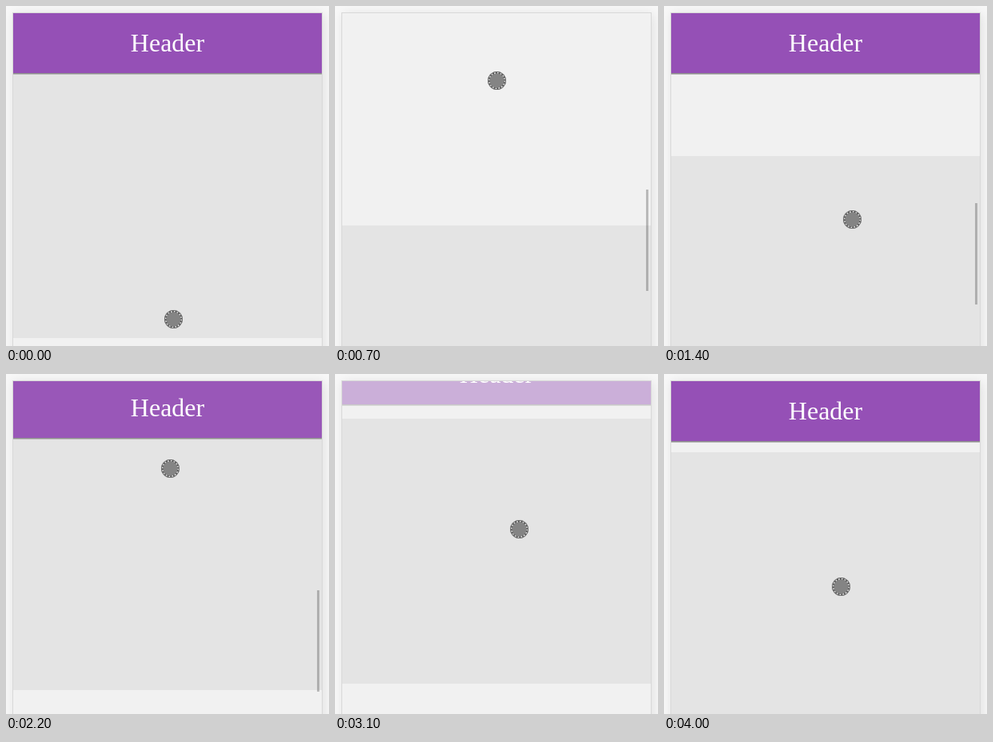
An HTML page with a canvas that plays this animation: 404 px wide and 426 px high, repeating every 4.3 s.

```html
<!DOCTYPE html>
<html lang="en">
<head>
<meta charset="utf-8">
<title>Hiding header</title>
<style>
  html, body { margin: 0; width: 100%; height: 100%; overflow: hidden; }
  canvas { display: block; }
</style>
</head>
<body>
<canvas id="stage" width="404" height="426"></canvas>
<script>
const ctx = document.getElementById('stage').getContext('2d');
const LOOP = 4300, STEP = 100;
const LEFT = 9, TOP = 9, WIDTH = 386, HEADER = 75, SECTION = 332;
const HIDDEN = 78, SLIDE = 250;

const smooth = u => u * u * (3 - 2 * u);
const coast = u => 1 - (1 - u) ** 3;

// A track starts at a value and runs through moves, each with its own easing.
const move = (start, end, to, ease = smooth) => ({ start, end, to, ease });
const track = (from, ...moves) => t => moves.reduce((value, m) => {
  const u = Math.min(1, Math.max(0, (t - m.start) / (m.end - m.start)));
  return value + (m.to - value) * m.ease(u);
}, from);

// Two swipes up, each followed by a slower drag down.
const pointerX = track(209.5,
  move(150, 600, 202.5), move(700, 1600, 240.3), move(1750, 2200, 205.5),
  move(2550, 3100, 230.5), move(3100, 3700, 222.5), move(3900, 4000, 221.5));
const pointerY = track(392.5,
  move(150, 600, 93.5), move(700, 1600, 292.6), move(1750, 2275, 108.5),
  move(2550, 3574, 264), move(3900, 4000, 266.5));
const scrollTop = track(0,
  move(150, 450, 350), move(450, 1031, 1316, coast), move(1050, 1600, 1184),
  move(1800, 2200, 1348), move(2200, 2944, 2720, coast), move(2944, 3273, 2642));

const slide = (start, to) => move(start, start + SLIDE, to);
const headerShift = track(0,
  slide(250, HIDDEN), slide(1150, 0), slide(2166, HIDDEN), slide(2990, 0));

function rect(color, x, y, w, h) {
  ctx.fillStyle = color;
  ctx.fillRect(x, y, w, h);
}

function drawFrame() {
  rect('#f8f8f8', 0, 0, 404, 426);
  ctx.save();
  ctx.shadowColor = 'rgba(0,0,0,.1)';
  ctx.shadowBlur = 14;
  ctx.shadowOffsetX = 2;
  ctx.shadowOffsetY = 2;
  rect('#d8d8d8', LEFT - 1, TOP - 1, WIDTH + 2, 460);
  ctx.restore();
}

function drawSections(scroll) {
  rect('#f1f1f1', LEFT, TOP, WIDTH, 426);
  for (let y = TOP + HEADER - scroll; y < 426; y += 2 * SECTION) {
    rect('#e4e4e4', LEFT, Math.round(y), WIDTH, SECTION);
  }
}

function drawHeader(shift) {
  if (shift >= HEADER) return;
  const y = TOP - Math.round(shift);
  ctx.globalAlpha = 1 - shift / HIDDEN;
  rect('#9550b6', LEFT, y, WIDTH, HEADER);
  rect('#8d8d8d', LEFT, y + HEADER, WIDTH, 1);
  rect('#b5b5b5', LEFT, y + HEADER + 1, WIDTH, 1);
  ctx.globalAlpha = 1;
  ctx.fillStyle = '#fff';
  ctx.font = '32px "Liberation Serif", serif';
  ctx.textAlign = 'center';
  ctx.fillText('Header', LEFT + WIDTH / 2, y + 48);
}

function drawScrollbar(scroll) {
  if (scroll > 0) rect('rgba(0,0,0,.23)', 389, Math.round(10 + scroll / 5.16), 3, 127);
}

function ring(color, radius, width, dashes) {
  const dash = Math.PI * radius / dashes;
  ctx.setLineDash(dashes ? [dash, dash] : []);
  ctx.strokeStyle = color;
  ctx.lineWidth = width;
  ctx.beginPath();
  ctx.arc(0, 0, radius, 0, 2 * Math.PI);
  ctx.stroke();
}

function drawPointer(x, y) {
  ctx.save();
  ctx.translate(Math.round(x - 0.5) + 0.5, Math.round(y - 0.5) + 0.5);
  ctx.fillStyle = '#848484';
  ctx.beginPath();
  ctx.arc(0, 0, 11.5, 0, 2 * Math.PI);
  ctx.fill();
  ring('#6c6c6c', 11, 1, 0);
  ring('#444', 9.8, 1.2, 0);
  ring('#f4f4f4', 9.8, 1.2, 16);
  ctx.restore();
}

function draw(t) {
  const scroll = scrollTop(t);
  drawFrame();
  ctx.save();
  ctx.beginPath();
  ctx.rect(LEFT, TOP, WIDTH, 426);
  ctx.clip();
  drawSections(scroll);
  drawHeader(headerShift(t));
  drawScrollbar(scroll);
  ctx.restore();
  drawPointer(pointerX(t), pointerY(t));
}

function tick() {
  const t = performance.now() % LOOP;
  draw(Math.floor(t / STEP) * STEP);
  requestAnimationFrame(tick);
}
tick();
</script>
</body>
</html>
```
